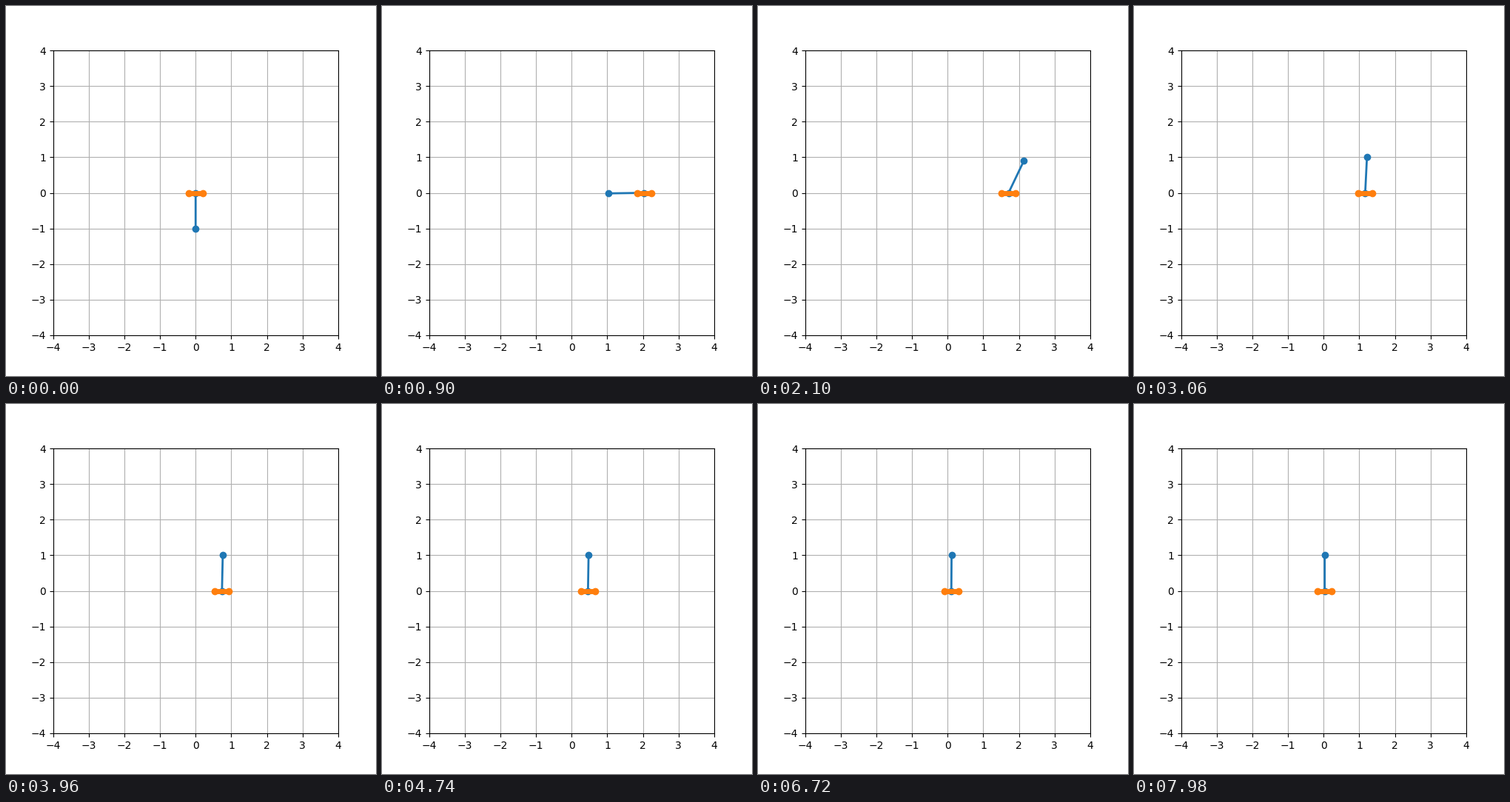
A matplotlib script for the animation above (8000 ms loop, 500x500 px).

```python
import numpy as np
import matplotlib.pyplot as plt
from matplotlib.animation import FuncAnimation

LOOP = 8000      # ms
TICK = 20        # ms between drawn frames
HOLD = 3         # each pose lasts 60 ms
LENGTH = 1.0     # pole
HALF = 0.2       # half width of the cart
BACK = 0.78      # seconds of back swing

# Cart path (seconds, position): a hard push right, then a long glide home.
PATH = [(0, 0), (0.36, 0.72), (0.84, 1.945), (1.2, 2.25), (1.68, 2.037),
        (2.1, 1.711), (2.52, 1.46), (3.36, 1.013), (5.04, 0.375),
        (6.72, 0.104), (9, 0.015)]


def spline(points):
    """Smooth cubic through the points, at rest at both ends."""
    t, y = np.array(points).T
    h = np.diff(t)
    rate = np.diff(y) / h
    n = len(t)
    a, b = np.eye(n), np.zeros(n)
    for i in range(1, n - 1):
        a[i, i - 1:i + 2] = h[i], 2 * (h[i - 1] + h[i]), h[i - 1]
        b[i] = 3 * (h[i] * rate[i - 1] + h[i - 1] * rate[i])
    m = np.linalg.solve(a, b)

    def value(s):
        k = np.searchsorted(t, s, side="right") - 1
        u = (s - t[k]) / h[k]
        v = 1 - u
        return (v * v * ((1 + 2 * u) * y[k] + u * h[k] * m[k])
                + u * u * ((1 + 2 * v) * y[k + 1] - v * h[k] * m[k + 1]))

    return value


cart_at = spline(PATH)


def angle_at(t):
    """Pole angle from straight down: back swing blended into the swing-up."""
    back = -0.815 * (1 - np.cos(np.pi * min(t / BACK, 1)))
    lean = 0.005 * (LOOP / 1000 - t)
    rise = np.pi - 4 * np.arctan(0.3605 * np.exp(-2.95 * (t - 1.68))) - lean
    return np.logaddexp(3 * back, 3 * rise) / 3


fig, ax = plt.subplots(figsize=(5, 5), dpi=100)
ax.set(xlim=(-4, 4), ylim=(-4, 4), aspect="equal",
       xticks=range(-4, 5), yticks=range(-4, 5))
ax.grid()

pole, = ax.plot([], [], "o-", lw=2, color="C0")
cart, = ax.plot([], [], "o-", lw=5, color="C1")


def update(i):
    t = i // HOLD * HOLD * TICK / 1000
    x, angle = cart_at(t), angle_at(t)
    pole.set_data([x, x + LENGTH * np.sin(angle)], [0, -LENGTH * np.cos(angle)])
    cart.set_data([x - HALF, x + HALF], [0, 0])
    return pole, cart


def start():
    return update(0)


anim = FuncAnimation(fig, update, frames=LOOP // TICK, init_func=start,
                     interval=TICK, repeat=True, repeat_delay=0, blit=True)
plt.show()
```
